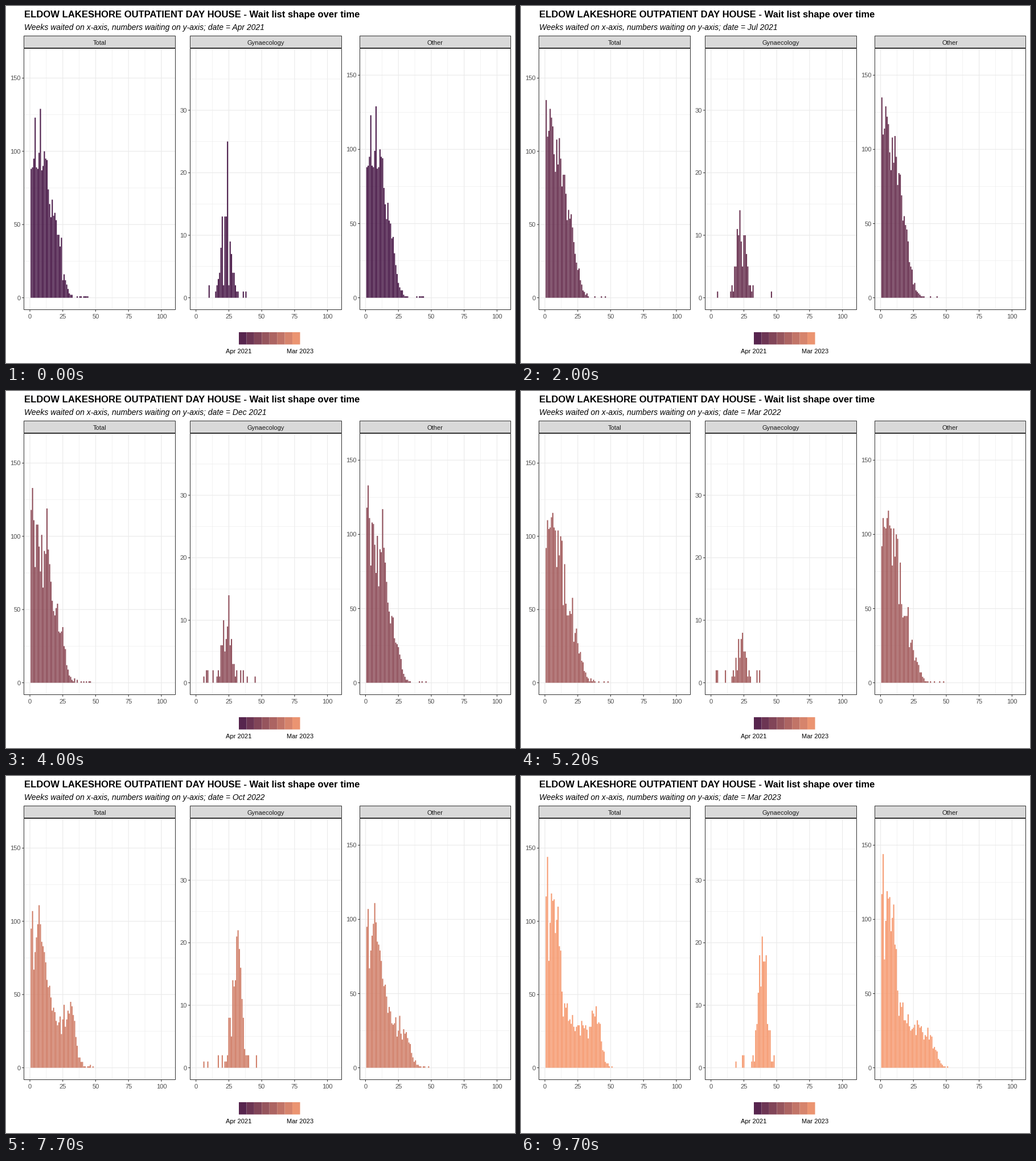
A matplotlib script for the animation above (10 s loop, 894 by 626 pixels).

```python
import numpy as np
import matplotlib.pyplot as plt
from matplotlib.animation import FuncAnimation
from matplotlib.collections import PolyCollection
from matplotlib.patches import Rectangle

W, H, DPI = 894, 626, 100
PX = 72 / DPI  # points per pixel
TOP, BOTTOM, ZERO = 74.5, 532.5, 511.6
WEEK = 2.309
BORDER, GRID, TICK_TEXT = "#333333", "#EBEBEB", "#4D4D4D"
LOW, HIGH = np.array([76, 29, 75]) / 255, np.array([246, 156, 115]) / 255

MONTHS = "Jan Feb Mar Apr May Jun Jul Aug Sep Oct Nov Dec".split()
COUNT = 24
STARTS = [5, 10, 15, *range(20, 97, 4)]  # frames where the bars switch month
weeks = np.arange(1, 101)


def falloff(edge, softness):
    """One below the edge, sliding to zero above it."""
    return 1 / (1 + np.exp((weeks - edge) / softness))


def other_counts(t, rng):
    """A crowd of recent referrals plus a shoulder that stretches with time."""
    recent = 82 * falloff(16 - 4 * t ** 2, 3)
    shoulder = (28 - 4 * t) * falloff(23 + 19 * t ** 2, 2)
    curve = (recent + shoulder) * rng.normal(1, .17, len(weeks))
    counts = np.round(curve)
    last = int(41 + 9 * t + rng.integers(0, 4))
    counts[(counts < 1) & (rng.random(len(weeks)) < .25)] = 1
    counts[last - 1] = max(counts[last - 1], 1)
    counts[last:] = 0
    return counts


def gynae_counts(month, rng):
    """One cluster that starts to age after the first year, and a few strays."""
    centre = np.interp(month, [15, 18, 23], [23, 31, 40])
    peak = np.interp(month, [0, 12, 15, 23], [13, 6, 19, 19])
    cluster = peak * np.exp(-.5 * ((weeks - centre) / 3.4) ** 2)
    counts = np.round(cluster * rng.normal(1, .35, len(weeks)).clip(.2))
    stray = (rng.random(len(weeks)) < .2) & (weeks > 3) & (weeks < 48)
    return np.maximum(counts, stray * rng.integers(1, 3, len(weeks)))


def month_counts(month):
    rng = np.random.default_rng(40 + month)
    other = other_counts(month / (COUNT - 1), rng)
    gynae = gynae_counts(month, rng)
    return other + gynae, gynae, other


DATA = [month_counts(m) for m in range(COUNT)]

plt.rcParams["font.family"] = "Liberation Sans"
fig = plt.figure(figsize=(W / DPI, H / DPI), dpi=DPI, facecolor="white")
ax = fig.add_axes([0, 0, 1, 1])
ax.set_xlim(0, W)
ax.set_ylim(H, 0)
ax.axis("off")


def label(x, y, text, size=8, color="black", **style):
    return ax.text(x, y, text, size=size, color=color, va="baseline", zorder=6, **style)


def line(x0, y0, x1, y1, color, width=1):
    ax.plot([x0, x1], [y0, y1], color=color, lw=width * PX, zorder=1,
            solid_capstyle="butt", snap=False)


def box(x0, y0, x1, y1, fill="none", edge=BORDER):
    ax.add_patch(Rectangle((x0, y0), x1 - x0, y1 - y0, facecolor=fill, edgecolor=edge,
                           lw=0 if edge == "none" else PX, zorder=4, snap=False))


def shade(share):
    return LOW + (HIGH - LOW) * share


class Panel:
    def __init__(self, name, left, right, origin, unit, step):
        self.origin, self.unit = origin, unit
        box(left, 52.5, right, TOP - 1, "#D9D9D9")
        label((left + right) / 2, 67.5, name, color="#1A1A1A", ha="center")

        for half in range(9):
            x = origin + half * 12.5 * WEEK
            major = half % 2 == 0
            line(x, TOP, x, BOTTOM, GRID, 1.2 if major else .6)
            if major:
                line(x, BOTTOM, x, BOTTOM + 3.5, BORDER)
                label(x, 547.5, f"{half * 25 // 2}", color=TICK_TEXT, ha="center")

        for half in range(8):
            y = ZERO - half * step / 2 * unit
            if y < TOP:
                break
            major = half % 2 == 0
            line(left, y, right, y, GRID, 1.2 if major else .6)
            if major:
                line(left - 3.5, y, left, y, BORDER)
                label(left - 6, y + 4, f"{half * step // 2}", color=TICK_TEXT, ha="right")

        box(left, TOP, right, BOTTOM)
        self.bars = PolyCollection([], linewidths=0, snap=False, zorder=3)
        ax.add_collection(self.bars, autolim=False)

    def show(self, counts, color):
        rects = []
        for week, count in zip(weeks, counts):
            if count > 0:
                x = self.origin + week * WEEK
                x0, x1, y = x - .45 * WEEK, x + .45 * WEEK, ZERO - count * self.unit
                rects.append([(x0, ZERO), (x0, y), (x1, y), (x1, ZERO)])
        self.bars.set_verts(rects)
        self.bars.set_facecolor(color)


panels = [
    Panel("Total", 31.5, 297.5, 42, 2.568, 50),
    Panel("Gynaecology", 323.5, 589.5, 333.7, 10.96, 10),
    Panel("Other", 621.5, 886.5, 631.5, 2.602, 50),
]

label(31.5, 20, "ELDOW LAKESHORE OUTPATIENT DAY HOUSE - Wait list shape over time",
      size=12, weight="bold")
subtitle = label(31.5, 42, "", size=10, style="italic")

edges = np.linspace(409, 516.5, 9)
for i in range(8):
    box(edges[i], 572, edges[i + 1], 593.5, shade((i + .5) / 8), edge="none")
label(edges[0], 609.3, "Apr 2021", ha="center")
label(edges[-1], 609.3, "Mar 2023", ha="center")


def update(frame):
    month = sum(start <= frame for start in STARTS)
    dated = sum(start < frame for start in STARTS)  # the date follows one frame later
    for panel, counts in zip(panels, DATA[month]):
        panel.show(counts, shade(month / (COUNT - 1)))
    date = f"{MONTHS[(dated + 3) % 12]} {2021 + (dated + 3) // 12}"
    subtitle.set_text(f"Weeks waited on x-axis, numbers waiting on y-axis; date = {date}")
    return []


animation = FuncAnimation(fig, update, frames=100, interval=100, repeat=True,
                          repeat_delay=0, blit=False)
plt.show()
```
